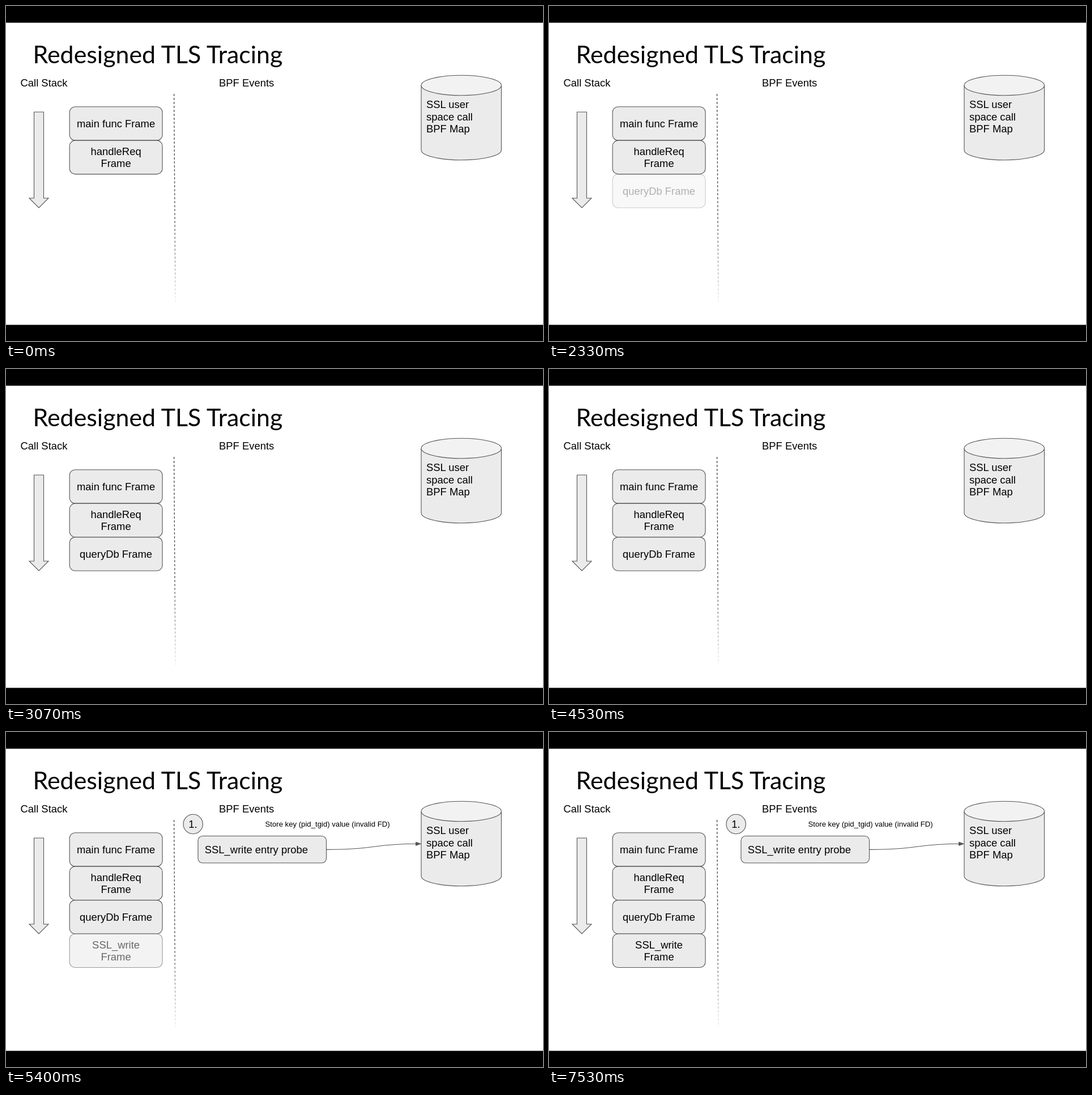
Animation of 948x591 px, one loop 8000 ms. Source, as an HTML page:

```html
<!DOCTYPE html>
<html lang="en">
<head>
<meta charset="utf-8">
<title>Redesigned TLS Tracing</title>
<style>
  html, body { margin: 0; width: 100%; height: 100%; overflow: hidden; background: #fff; }
  svg { display: block; width: 948px; height: 591px; }
  text { font: 18.43px "Liberation Sans", Arial, sans-serif; fill: #000; }
  .title { font: 42.9px Lato, sans-serif; }
  .small { font-size: 13.17px; }
  .mid { text-anchor: middle; }
  .shape { fill: #ebebeb; stroke: #545454; stroke-width: 1.1; }
  .line { fill: none; stroke: #545454; stroke-width: 1.1; }
</style>
</head>
<body>
<svg viewBox="0 0 948 591">
  <defs>
    <linearGradient id="fade" gradientUnits="userSpaceOnUse" x1="0" y1="155" x2="0" y2="522">
      <stop offset="0" stop-color="#444"/>
      <stop offset=".6" stop-color="#555"/>
      <stop offset="1" stop-color="#555" stop-opacity=".1"/>
    </linearGradient>
  </defs>
  <path d="M0 0H948V29.5H0ZM0 562.5H948V591H0Z"/>

  <text class="title" x="47.5" y="100.5">Redesigned TLS Tracing</text>
  <text x="25.5" y="141.5">Call Stack</text>
  <text x="376" y="141.5">BPF Events</text>

  <path class="shape" d="M49.5 187H66.5V339H75L58 356L41 339H49.5Z"/>
  <path d="M296.6 155L299 522" fill="none" stroke="url(#fade)" stroke-width="1.3" stroke-dasharray="4 3"/>

  <path class="shape" d="M733 140V254A70.75 17.7 0 0 0 874.5 254V140"/>
  <ellipse class="shape" cx="803.75" cy="140" rx="70.75" ry="17.7" style="fill:#f2f2f2"/>
  <text x="742" y="180">SSL user</text>
  <text x="742" y="201.6">space call</text>
  <text x="742" y="223.2">BPF Map</text>

  <g id="stack"></g>

  <g id="probe" visibility="hidden">
    <circle class="shape" cx="330.2" cy="162.5" r="17.2"/>
    <text x="322.3" y="169">1.</text>
    <rect class="shape" x="339" y="183.5" width="226.5" height="47.5" rx="8"/>
    <text x="350.8" y="214.3">SSL_write entry probe</text>
    <text class="small" x="457.5" y="167.3">Store key (pid_tgid) value (invalid FD)</text>
    <path class="line" d="M565.5 207.4C649 207.4 649 197.5 724 197.3"/>
    <path d="M732.5 197.2L723.5 194.2V200.4Z" fill="#545454" stroke="#545454" stroke-width=".8"/>
  </g>
</svg>
<script>
  const LOOP = 8000, FPS = 15, FADE = 1000;
  const PROBE_AT = 4930;
  // label lines and the time the fade starts (null: always shown)
  const frames = [
    { lines: ["main func Frame"], start: null },
    { lines: ["handleReq", "Frame"], start: null },
    { lines: ["queryDb Frame"], start: 2067 },
    { lines: ["SSL_write", "Frame"], start: 4867 }
  ];

  const el = (parent, name, attrs, text = "") => {
    const node = document.createElementNS("http://www.w3.org/2000/svg", name);
    for (const key in attrs) node.setAttribute(key, attrs[key]);
    node.textContent = text;
    return parent.appendChild(node);
  };

  const stack = document.getElementById("stack");
  const probe = document.getElementById("probe");

  frames.forEach((frame, i) => {
    const top = 177.7 + i * 59.45;
    frame.node = el(stack, "g", {});
    el(frame.node, "rect", { class: "shape", x: 112.2, y: top, width: 163.9, height: 59.45, rx: 9.9 });
    frame.lines.forEach((line, j) => {
      const y = top + 36.4 + (j - (frame.lines.length - 1) / 2) * 21.6;
      el(frame.node, "text", { class: "mid", x: 194.1, y }, line);
    });
  });

  const clamp = v => Math.min(1, Math.max(0, v));
  const ease = p => p + 0.2 * p * (1 - p);

  function draw(now) {
    // small slack keeps rounded times on the right step
    const t = Math.floor((now % LOOP + 5) * FPS / 1000) * 1000 / FPS;
    for (const { node, start } of frames) {
      if (start !== null) node.setAttribute("opacity", ease(clamp((t - start) / FADE)));
    }
    probe.setAttribute("visibility", t >= PROBE_AT ? "visible" : "hidden");
  }

  const begin = performance.now();
  function tick() {
    draw(performance.now() - begin);
    requestAnimationFrame(tick);
  }
  tick();
</script>
</body>
</html>
```
